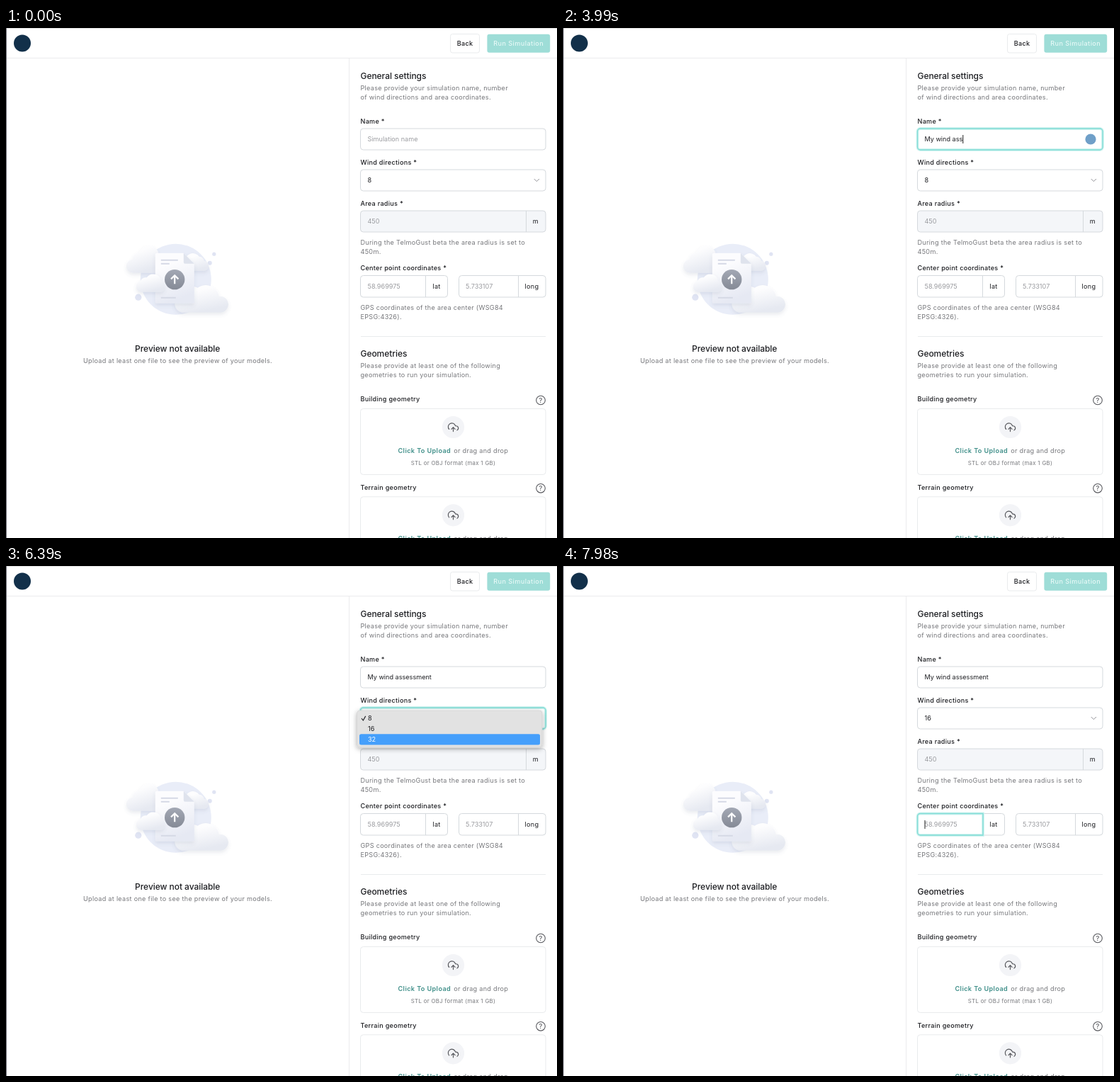
Write an HTML page that moves like this. It is 778x720 px and loops after 8 s.

```html
<!DOCTYPE html>
<html lang="en">
<head>
<meta charset="utf-8">
<title>Simulation settings</title>
<style>
  html, body { margin: 0; width: 100%; height: 100%; overflow: hidden; background: #fff; }
  svg { display: block; width: 100vw; height: 100vh; }
  text { font: 400 9.1px Inter, sans-serif; fill: #1d1e22; }
  .head { font-size: 12px; font-weight: 500; letter-spacing: -.05px; }
  .label { font-weight: 500; letter-spacing: .27px; }
  .note { fill: #76777b; letter-spacing: .29px; }
  .hint { fill: #9b9ca0; }
  .unit { letter-spacing: .3px; }
  .link { fill: #3f8f89; font-weight: 600; letter-spacing: .4px; }
  .small { font-size: 7.8px; fill: #76777b; letter-spacing: .33px; }
  .mid { text-anchor: middle; }
  .box { fill: #fff; stroke: #d5d9dd; }
  .rule { fill: none; stroke: #d5d9dd; }
  .faint { fill: none; stroke: #e9ebed; }
  .icon { fill: none; stroke: #56575c; stroke-linecap: round; stroke-linejoin: round; }
  .ring path { fill: none; stroke: #d0f3f0; stroke-width: 3.8; }
  .ring path + path { stroke: #80dcd5; stroke-width: 1.4; }
  .tip text { fill: #fff; font-weight: 500; text-anchor: middle; }
  #name { white-space: pre; }
</style>
</head>
<body>
<svg viewBox="0 0 778 720" preserveAspectRatio="none">
  <defs>
    <linearGradient id="cloud" x2=".4" y2="1">
      <stop offset=".3" stop-color="#fdfdfe"/><stop offset="1" stop-color="#e6e9f1"/>
    </linearGradient>
    <linearGradient id="paper" x2=".3" y2="1">
      <stop offset=".3" stop-color="#fcfcfe"/><stop offset="1" stop-color="#e6e9f3"/>
    </linearGradient>
    <linearGradient id="badge" x2="0" y2="1">
      <stop stop-color="#a3a8b4"/><stop offset="1" stop-color="#858a96"/>
    </linearGradient>
    <filter id="soft" x="-30%" y="-30%" width="160%" height="180%">
      <feDropShadow dx="0" dy="3" stdDeviation="2.5" flood-color="#5a6480" flood-opacity=".12"/>
    </filter>
    <filter id="menuShadow" x="-10%" y="-30%" width="120%" height="170%">
      <feDropShadow dx="0" dy="2" stdDeviation="3.5" flood-opacity=".32"/>
    </filter>
    <g id="upload">
      <rect class="faint" x="500.5" y="537.5" width="261.5" height="93" rx="4"/>
      <circle cx="631.5" cy="563.5" r="15.6" fill="#f3f4f7"/>
      <path class="icon" stroke-width="1.8" transform="translate(623.7 555.9) scale(.65)"
        d="M16 16l-4-4-4 4M12 12v9M20.39 18.39A5 5 0 0 0 18 9h-1.26A8 8 0 1 0 3 16.3"/>
      <text class="link" x="553.5" y="600">Click To Upload</text>
      <text class="note" x="632.3" y="600">or drag and drop</text>
      <text class="small mid" x="631.5" y="617">STL or OBJ format (max 1 GB)</text>
      <circle class="icon" cx="755" cy="525.5" r="6.3" stroke-width="1.1"/>
      <text class="mid" x="755" y="529" style="font-weight:500;fill:#56575c">?</text>
    </g>
  </defs>

  <!-- header -->
  <path d="M0 .5H778" stroke="#dededf"/>
  <path d="M.5 0V720" stroke="#73737c"/>
  <path d="M1 42.5H778M484.5 43V720" stroke="#ebebed"/>
  <circle cx="23" cy="21.5" r="12" fill="#12304a"/>
  <rect class="faint" x="627.5" y="8.5" width="41" height="26.5" rx="3"/>
  <text class="label mid" x="648" y="25">Back</text>
  <rect x="679.4" y="8.8" width="88.8" height="26" rx="3" fill="#9eddd7"/>
  <text class="label mid" x="723.7" y="25" style="fill:#e6f8f6;letter-spacing:.45px">Run Simulation</text>

  <!-- empty preview -->
  <g transform="translate(.8 .8)">
    <circle cx="239" cy="354" r="50" fill="#e9edf8"/>
    <g fill="#e0e4f3">
      <circle cx="293" cy="318.4" r="2.6"/><circle cx="287" cy="331" r="3"/><circle cx="186" cy="379.4" r="4.6"/>
    </g>
    <g fill="url(#cloud)" filter="url(#soft)">
      <path d="M179 345a9.5 9.5 0 0 1-1-19a10 10 0 0 1 10-10a14 14 0 0 1 26-1V345Z"/>
      <path d="M252 342a7 7 0 0 1 0-13a11 11 0 0 1 20-7a7 7 0 0 1 7 6a7 7 0 0 1-1 14Z"/>
      <path d="M248 401a13 13 0 0 1-2-25a17 17 0 0 1 24-10a19 19 0 0 1 30 12a11.5 11.5 0 0 1 3 23Z"/>
    </g>
    <path d="M212 317H250L265 332V386a2 2 0 0 1-2 2H212a2 2 0 0 1-2-2V319a2 2 0 0 1 2-2Z" fill="url(#paper)" filter="url(#soft)"/>
    <path d="M250 317V330a2 2 0 0 0 2 2H265Z" fill="#dfe3ed"/>
    <path d="M218 327H242M218 332H230M218 380H239" stroke="#d5d9e5" stroke-width="2"/>
    <path d="M189 372a8 8 0 0 1 0-15.5a9 9 0 0 1 9-5a11 11 0 0 1 20 5a8 8 0 0 1-1 15.5Z" fill="url(#cloud)" filter="url(#soft)"/>
    <circle cx="237.4" cy="354.3" r="14.2" fill="url(#badge)"/>
    <path d="M237.4 360.5V349M232.2 353.6L237.4 348.4L242.6 353.6" fill="none" stroke="#fff" stroke-width="2.2"/>
  </g>
  <text class="head mid" x="242.2" y="457">Preview not available</text>
  <text class="note mid" x="242.5" y="472.7">Upload at least one file to see the preview of your models.</text>

  <!-- general settings -->
  <text class="head" x="500.5" y="71.5">General settings</text>
  <text class="note" x="500.5" y="87.5">Please provide your simulation name, number</text>
  <text class="note" x="500.5" y="100.5">of wind directions and area coordinates.</text>

  <text class="label" x="500.5" y="134.5">Name *</text>
  <rect class="box" x="500.5" y="142" width="261.5" height="30" rx="4"/>
  <g class="ring" id="nameRing"></g>
  <text class="hint" id="nameHint" x="510.5" y="160.3">Simulation name</text>
  <text id="name" x="510.5" y="160.3" xml:space="preserve"></text>
  <rect id="caret" y="151" width="1" height="12" fill="#222"/>
  <circle id="helper" cx="745" cy="157" r="7.6" fill="#6f9fc8"/>

  <text class="label" x="500.5" y="192.5">Wind directions *</text>
  <rect class="box" x="500.5" y="200" width="261.5" height="30" rx="4"/>
  <g class="ring" id="selectRing"></g>
  <text id="directions" x="510.5" y="218.3"></text>
  <path class="icon" d="M746 213.3L749.3 216.6L752.6 213.3" style="stroke:#929398"/>

  <text class="label" x="500.5" y="250.5">Area radius *</text>
  <rect class="box" x="500.5" y="258" width="261.5" height="30" rx="4" style="fill:#f4f6f9"/>
  <path class="rule" d="M734.5 258V288"/>
  <text class="hint" x="510.5" y="276.3">450</text>
  <text class="unit mid" x="748" y="276.3">m</text>
  <text class="note" x="500.5" y="305.5">During the TelmoGust beta the area radius is set to</text>
  <text class="note" x="500.5" y="318.5">450m.</text>

  <text class="label" x="500.5" y="342.3">Center point coordinates *</text>
  <rect class="box" x="500.5" y="349.5" width="123" height="30.5" rx="4"/>
  <rect class="box" x="639.5" y="349.5" width="122.5" height="30.5" rx="4"/>
  <path class="rule" d="M592.5 349.5V380M723.5 349.5V380"/>
  <g class="ring" id="latRing"></g>
  <text class="hint" x="510.5" y="368.2">58.969975</text>
  <rect id="latCaret" x="510.5" y="359" width="1" height="12" fill="#222"/>
  <text class="unit mid" x="608" y="368.2">lat</text>
  <text class="hint" x="649" y="368.2">5.733107</text>
  <text class="unit mid" x="742.5" y="368.2">long</text>
  <text class="note" x="500.5" y="397.5">GPS coordinates of the area center (WSG84</text>
  <text class="note" x="500.5" y="410.5">EPSG:4326).</text>

  <!-- geometries -->
  <path class="faint" d="M501 435.5H762"/>
  <text class="head" x="500.5" y="464">Geometries</text>
  <text class="note" x="500.5" y="480">Please provide at least one of the following</text>
  <text class="note" x="500.5" y="493">geometries to run your simulation.</text>
  <text class="label" x="500.5" y="527">Building geometry</text>
  <use href="#upload"/>
  <text class="label" x="500.5" y="651.5">Terrain geometry</text>
  <use href="#upload" y="124.3"/>

  <!-- overlays -->
  <g class="tip" id="tip">
    <path d="M577 113.5H773a5 5 0 0 1 5 5V139a5 5 0 0 1-5 5H749.5L745 148.5L740.5 144H577a5 5 0 0 1-5-5V118.5a5 5 0 0 1 5-5Z"/>
    <text x="675.5" y="126">Press the Vornlatch icon in your browser’s</text>
    <text x="675.5" y="138">toolbar to unlock</text>
  </g>
  <g id="menu">
    <rect x="495.5" y="204" width="261.5" height="52" rx="4" fill="#e2e2e2" stroke="#cfcfcf" stroke-width=".6" filter="url(#menuShadow)"/>
    <rect id="mark" x="499" width="255" height="15.2" rx="2.5" fill="#459ffb"/>
    <path id="check" class="icon" d="M502.3 215.5L504.3 218L507.5 212.3" stroke-width="1.2"/>
    <g id="options"></g>
  </g>
</svg>
<script>
  const LOOP = 8000;
  const TITLE = "My wind assessment";
  const OPTIONS = [8, 16, 32];

  const $ = id => document.getElementById(id);
  const show = (id, alpha) => $(id).setAttribute("opacity", Number(alpha));
  const between = (t, a, b) => t >= a && t < b;

  // Latest value of a [time, value] table; 0 before its first step.
  const stepAt = (steps, t) => {
    let value = 0;
    for (const [time, next] of steps) if (t >= time) value = next;
    return value;
  };

  const keyTimes = [1710, 1920, 2010, 2910, 2990, 3070, 3150, 3360, 3480, 3600,
                    3990, 4260, 4620, 4740, 5040, 5120, 5200, 5280];
  const tipSteps = [[1140, .35], [1200, .8], [1230, 1], [1710, .6], [1740, .25], [1770, 0]];
  const focusSteps = [[1140, .4], [1200, .8], [1230, 1], [6210, 0]];
  const menuSteps = [[6210, 1], [7170, .93], [7200, .82], [7230, .65], [7260, .47],
                     [7290, .3], [7320, .14], [7350, 0]];
  // Highlighted row counted from 1; 0 is none.
  const rowSteps = [[6210, 1], [6300, 2], [6390, 3], [6630, 2], [7050, 0], [7110, 2]];

  function addRing(id, y, height, right, r = 4) {
    const d = `M504.5 ${y}H${right - r}a${r} ${r} 0 0 1 ${r} ${r}V${y + height - r}` +
      `a${r} ${r} 0 0 1 ${-r} ${r}H504.5a4 4 0 0 1-4-4V${y + 4}a4 4 0 0 1 4-4Z`;
    $(id).innerHTML = `<path d="${d}"/><path d="${d}"/>`;
  }
  addRing("nameRing", 142, 30, 762);
  addRing("selectRing", 200, 30, 762);
  addRing("latRing", 349.5, 30.5, 593, 0);
  $("options").innerHTML = OPTIONS.map((n, i) => `<text x="511" y="${218.2 + 15 * i}">${n}</text>`).join("");

  function draw(t) {
    const typed = keyTimes.filter(time => t >= time).length;
    const name = $("name");
    const text = TITLE.slice(0, typed);
    if (name.textContent !== text) name.textContent = text;
    $("caret").setAttribute("x", 510.5 + (typed ? name.getComputedTextLength() : 0));
    show("caret", between(t, 1200, 1620) || between(t, 1710, 2490) || between(t, 2910, 5700));
    show("nameHint", !typed);

    const focus = stepAt(focusSteps, t);
    show("nameRing", focus);
    show("helper", focus);
    show("tip", stepAt(tipSteps, t));

    show("selectRing", between(t, 6210, 7980));
    $("directions").textContent = t < 7230 ? 8 : 16;
    show("menu", stepAt(menuSteps, t));
    const row = stepAt(rowSteps, t);
    show("mark", row > 0);
    $("mark").setAttribute("y", 207.2 + 15 * (row - 1));
    [...$("options").children].forEach((option, i) => option.style.fill = i + 1 === row ? "#fff" : "#1d1e22");
    $("check").style.stroke = row === 1 ? "#fff" : "#1d1e22";

    show("latRing", t >= 7980);
    show("latCaret", t >= 7980);
  }

  const start = performance.now();
  function tick() {
    draw((performance.now() - start) % LOOP);
    requestAnimationFrame(tick);
  }
  tick();
</script>
</body>
</html>
```
